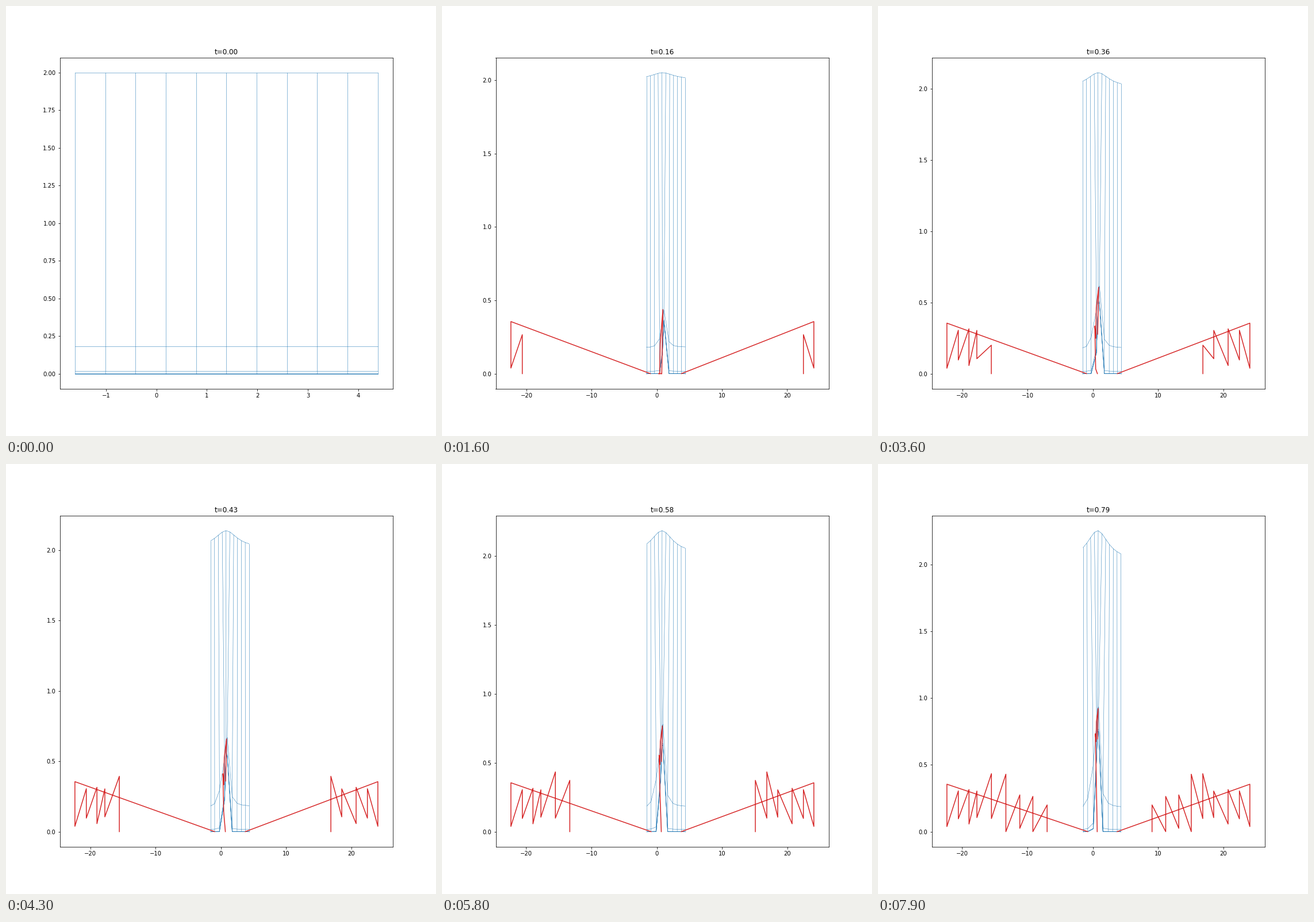
Write a matplotlib script that moves like this. It is 748 px wide and 748 px high and loops after 8000 ms.

```python
import matplotlib.pyplot as plt
import numpy as np
from matplotlib.animation import FuncAnimation

FRAMES, INTERVAL = 80, 100
COL = np.arange(11)
FRACTIONS = [1, .09, .0081, .0007, .00006, 0]

# Outer spikes: where, when and how high they grow
LEFT = [-22.41, -20.66, -19.03, -17.82, -15.6, -13.39, -11.26, -9.26, -7.08]
RIGHT = [24.13, 22.53, 20.8, 18.6, 16.93, 15.17, 13.26, 11.26, 9.17]
BIRTH = [.005, .095, .175, .251, .325, .44, .6, .7, .765, .86]
TOP = [.355, .305, .315, .304, .434, .43, .275, .264, .3]
LOW = [.038, .096, .057, .105, .098, 0, .025, 0, 0]

# Central fold: offsets from its tip
FOLD_DX = np.array([-.12, 0, -.28, -.33, -.45, -.35, -.15])
FOLD_DROP = np.array([.23, 0, .1, .25, .19, .4, 1])


def ease_out(t, tau):
    return 1 - np.exp(-t / tau)


def tip_height(t):
    return .36 * ease_out(t, .06) + .73 * t


def mesh(t):
    """Node positions, rows from top to bottom."""
    tip = tip_height(t)
    top_x = np.linspace(-1.614 + .17 * t, 4.386 - .12 * t, len(COL))
    bell = 1 / (1 + (COL - 4.25 + .5 * t) ** 2 / 11.7)
    top_y = 2 + .32 * t * (.1 + .9 * bell)

    # Columns crowd towards the crack
    rest = np.linspace(-1.614, 4.386, len(COL))
    u = rest - (.95 - .3 * t)
    pull = .8 * ease_out(t, .06) / (1 + (u / (.55 + .8 * t)) ** 4)
    x = rest - pull * u
    x[0], x[-1] = top_x[0], top_x[-1]

    # Steep lift left of the crack, long tail on its right
    d = 5 - COL
    edge = 3 * ease_out(t, .27)
    shoulder = 1 / (1 + np.exp((d - edge) / .5))
    tail = .14 / np.maximum(-d, 1) ** 1.7
    y = .18 + max(tip - .18, 0) * np.where(d >= 0, shoulder, tail)
    low_y = .8 * tip * np.clip((edge + .2 - d) / 1.4, 0, 1) * (d >= 0)

    xs = [top_x] + [x] * len(FRACTIONS)
    ys = [top_y] + [low_y + f * (y - low_y) for f in FRACTIONS]
    return np.array(xs), np.array(ys)


def spikes(places, t, anchor):
    """Zigzag from the mesh foot out to the edge and back inwards."""
    xs, ys = [anchor], [0]
    born = sum(t >= b for b in BIRTH)
    for k in range(born):
        age = (t - BIRTH[k]) / (BIRTH[k + 1] - BIRTH[k])
        grow = np.clip(2 * age - 1, 0, 1)
        xs += [places[k] - np.sign(places[0]) * .13 * t] * 2
        ys += [.2 + (TOP[k] - .2) * grow, LOW[k] if k < born - 1 else 0]
    return xs, ys


def fold(t):
    x = .97 - .18 * t + (1.6 - .8 * t) * FOLD_DX
    y = (tip_height(t) - .015) * (1 - np.minimum(.85 / t * FOLD_DROP, 1))
    return x, y


fig, ax = plt.subplots(figsize=(748 / 72, 748 / 72), dpi=72)
thin = dict(color="tab:blue", lw=.5)
rows = [ax.plot([], [], **thin)[0] for _ in range(len(FRACTIONS) + 1)]
cols = [ax.plot([], [], **thin)[0] for _ in COL]
reds = [ax.plot([], [], color="tab:red", lw=1.5)[0] for _ in range(3)]
title = ax.set_title("")


def draw(i):
    t = i / 100
    x, y = mesh(t)
    for k, line in enumerate(rows):
        line.set_data(x[k], y[k])
    for k, line in enumerate(cols):
        line.set_data(x[:, k], y[:, k])
    paths = [([], [])] * 3
    if t > 0:
        paths = [spikes(LEFT, t, x[-1, 1]), spikes(RIGHT, t, x[-1, 9]), fold(t)]
    for line, path in zip(reds, paths):
        line.set_data(*path)
    title.set_text(f"t={t:.2f}")
    ax.relim()
    ax.autoscale_view()
    return rows + cols + reds + [title]


anim = FuncAnimation(fig, draw, frames=FRAMES, interval=INTERVAL,
                     init_func=lambda: draw(0), repeat=True, repeat_delay=0)
plt.show()
```
